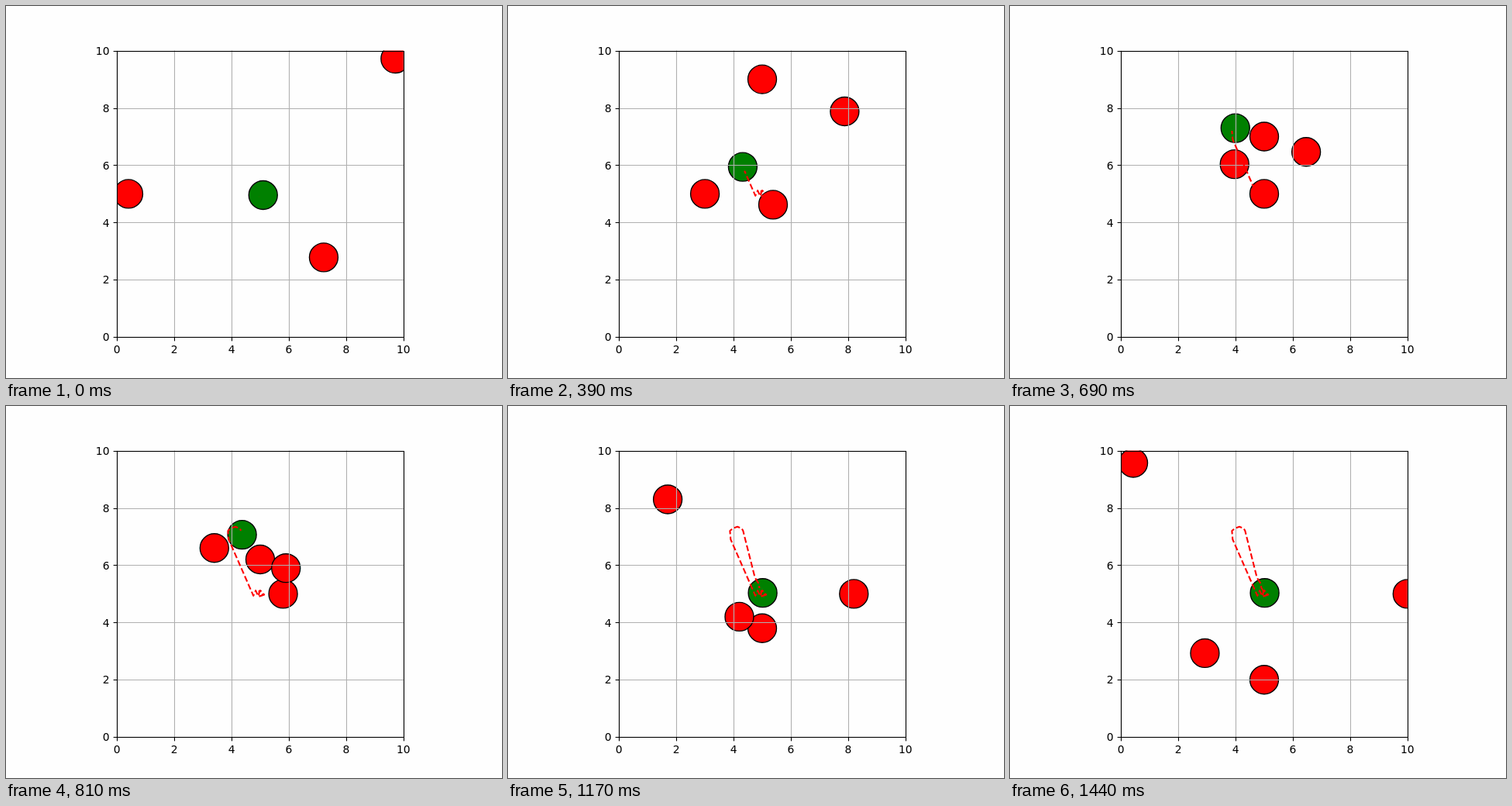
Write an HTML page with a canvas that moves like this. It is 640 px wide and 480 px high and loops after 1470 ms.

```html
<!DOCTYPE html>
<html lang="en">
<head>
<meta charset="utf-8">
<style>
  html, body { margin: 0; width: 640px; height: 480px; overflow: hidden; background: #fefefe; }
  canvas { display: block; }
</style>
</head>
<body>
<canvas id="stage" width="640" height="480"></canvas>
<script>
const ctx = document.getElementById('stage').getContext('2d');
const STEPS = 50, STEP_MS = 30, DT = 0.1, VMAX = 2, RADIUS = 0.5;
const GOAL = [5, 5];
const LEFT = 143.2, BOTTOM = 427.2, SIZE = 369.6, UNIT = SIZE / 10, PT = 100 / 72;

const polar = (r, a) => [r * Math.cos(a), r * Math.sin(a)];
const add = (a, b, k = 1) => [a[0] + k * b[0], a[1] + k * b[1]];

// Obstacles move in straight lines at constant speed.
const obstacles = [
  { start: [5, 12], v: polar(VMAX, -Math.PI / 2) },
  { start: [0, 5], v: polar(VMAX, 0) },
  { start: [10, 10], v: polar(VMAX, -Math.PI * 0.75) },
  { start: [7.5, 2.5], v: polar(VMAX, Math.PI * 0.75) }
];
const obstacleAt = (o, i) => add(o.start, o.v, DT * (i + 1));

// Candidate velocities: 20 headings by 5 speeds.
const heading = n => n * 2 * Math.PI / 19;
const samples = [];
for (let n = 0; n < 20; n++)
  for (let s = 0; s < 5; s++) samples.push(polar(s * VMAX / 4, heading(n)));

// True if velocity v leads the robot at p into obstacle o.
function collides(v, p, o, i) {
  const away = add(p, obstacleAt(o, i), -1);
  const theta = Math.atan2(away[1], away[0]);
  const reach = 2.2 * RADIUS;
  const phi = Math.asin(reach / Math.max(reach, Math.hypot(...away)));
  const [rx, ry] = add(v, o.v, -1);
  const side = a => Math.cos(a) * ry - Math.sin(a) * rx;
  return side(theta + phi) > 0 && side(theta - phi) < 0;
}

function chooseVelocity(p, i) {
  const toGoal = add(GOAL, p, -1), dist = Math.hypot(...toGoal);
  const wanted = dist < RADIUS / 5 ? [0, 0] : toGoal.map(d => d * VMAX / dist);
  let best = [0, 0], bestCost = Infinity;
  for (const v of samples) {
    const cost = Math.hypot(...add(v, wanted, -1));
    if (cost < bestCost && !obstacles.some(o => collides(v, p, o, i))) {
      best = v;
      bestCost = cost;
    }
  }
  return best;
}

// The first two moves are fixed, the rest follow from the avoidance rule.
const robot = [add(GOAL, polar(1, heading(13)), DT)];
robot.push(add(robot[0], polar(1.5, heading(1)), DT));
for (let i = 2; i < STEPS; i++)
  robot.push(add(robot[i - 1], chooseVelocity(robot[i - 1], i), DT));

const px = x => LEFT + x * UNIT;
const py = y => BOTTOM - y * UNIT;
const snap = v => Math.floor(v + 0.5) + 0.5;

function stroke(points, color, width) {
  ctx.strokeStyle = color;
  ctx.lineWidth = width * PT;
  ctx.beginPath();
  points.forEach(p => ctx.lineTo(...p));
  ctx.stroke();
}

function disc([x, y], color) {
  ctx.beginPath();
  ctx.arc(px(x), py(y), RADIUS * UNIT, 0, 2 * Math.PI);
  ctx.fillStyle = color;
  ctx.fill();
  ctx.strokeStyle = '#000';
  ctx.lineWidth = PT;
  ctx.stroke();
}

function drawAxes() {
  const x0 = snap(px(0)), x1 = snap(px(10)), y0 = snap(py(0)), y1 = snap(py(10));
  ctx.font = `${10 * PT}px "DejaVu Sans", sans-serif`;
  for (let v = 0; v <= 10; v += 2) {
    const x = snap(px(v)), y = snap(py(v));
    stroke([[x, y0], [x, y0 + 4.86]], '#000', 0.8);
    stroke([[x0, y], [x0 - 4.86, y]], '#000', 0.8);
    ctx.fillStyle = '#000';
    ctx.textAlign = 'center';
    ctx.fillText(v, px(v), 448);
    ctx.textAlign = 'right';
    ctx.fillText(v, 133.5, Math.round(py(v) + 5.2));
  }
  ctx.strokeStyle = '#000';
  ctx.lineWidth = 0.8 * PT;
  ctx.strokeRect(x0, y0, x1 - x0, y1 - y0);
}

function draw(i) {
  ctx.fillStyle = '#fefefe';
  ctx.fillRect(0, 0, 640, 480);

  ctx.save();
  ctx.beginPath();
  ctx.rect(LEFT, BOTTOM - SIZE, SIZE, SIZE);
  ctx.clip();
  disc(robot[i], '#008000');
  obstacles.forEach(o => disc(obstacleAt(o, i), '#f00'));
  for (let v = 0; v <= 10; v += 2) {
    const x = snap(px(v)), y = snap(py(v));
    stroke([[x, 0], [x, 480]], '#b0b0b0', 0.8);
    stroke([[0, y], [640, y]], '#b0b0b0', 0.8);
  }
  ctx.lineJoin = 'round';
  ctx.setLineDash([5.55 * PT, 2.4 * PT]);
  stroke(robot.slice(0, i).map(([x, y]) => [px(x), py(y)]), '#f00', 1.5);
  ctx.restore();

  drawAxes();
}

const began = performance.now();
function tick() {
  const elapsed = performance.now() - began;
  draw(1 + Math.floor(elapsed / STEP_MS) % (STEPS - 1));
  requestAnimationFrame(tick);
}
tick();
</script>
</body>
</html>
```
